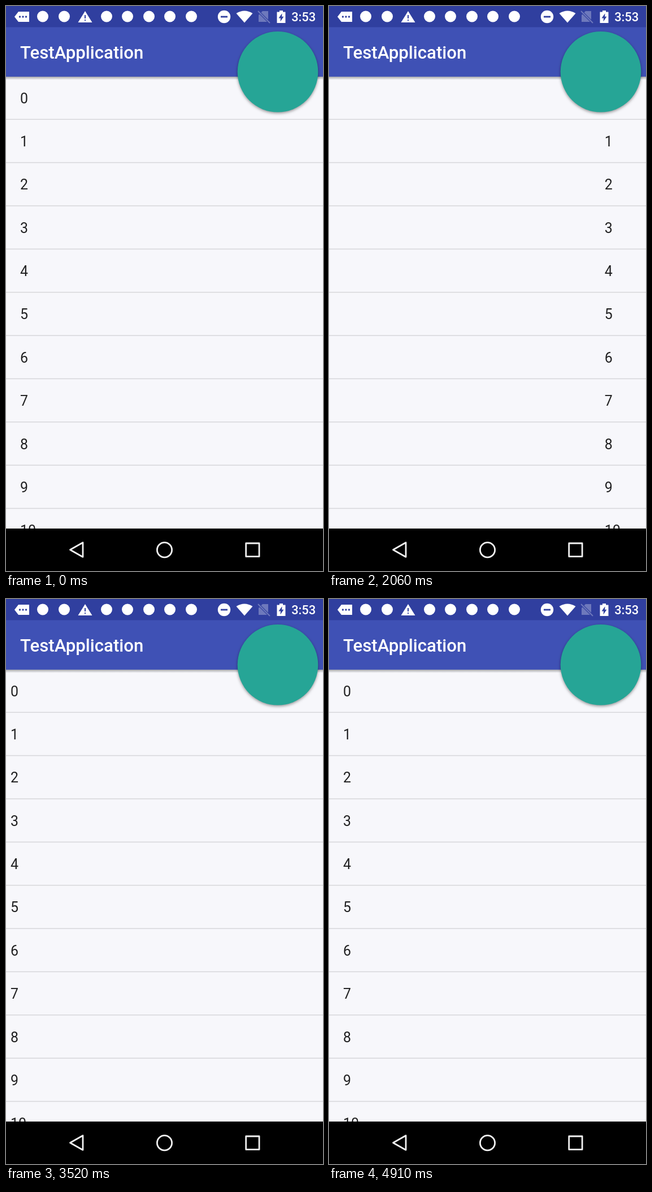
Recreate the animation shown at these times as an HTML page with a canvas. Size 561 px wide and 998 px high, loop 4950 ms.

```html
<!DOCTYPE html>
<html lang="en">
<head>
<meta charset="utf-8">
<title>List drag</title>
<style>
  html, body { margin: 0; width: 100%; height: 100%; overflow: hidden; background: #000; }
  canvas { display: block; }
</style>
</head>
<body>
<canvas id="stage" width="561" height="998"></canvas>
<script>
const ctx = document.getElementById('stage').getContext('2d');
const W = 561, LOOP = 4950, TICK = 100 / 3;
const DP = W / 360;
const STATUS_H = 24 * DP, BAR_BOTTOM = 80 * DP, NAV_TOP = 923;
const ROW = 49 * DP, REST_X = 16 * DP;
const STATUS_COLOR = '#303f9f';

// Each drag pulls the row text from one x to another; release snaps it back.
const drags = [
  { start: 1250, end: 2100, from: 0, to: 488 },
  { start: 2440, end: 3280, from: 0, to: 483 },
  { start: 3520, end: 4260, from: 8, to: 485 },
  { start: 4570, end: 4910, from: 0, to: 400 },
];

const tickAt = t => Math.floor((t + 5) / TICK);

function textX(t) {
  const d = drags.find(d => t >= d.start && t < d.end);
  if (!d) return REST_X;
  const elapsed = (tickAt(t) - tickAt(d.start)) * TICK;
  const p = Math.min(1, elapsed / (d.end - d.start - 30));
  return d.from + (d.to - d.from) * Math.sin(p * Math.PI / 2);
}

function rect(x, y, w, h, color) {
  ctx.fillStyle = color;
  ctx.fillRect(x, y, w, h);
}

function disc(x, y, r, color) {
  ctx.fillStyle = color;
  ctx.beginPath();
  ctx.arc(x, y, r, 0, Math.PI * 2);
  ctx.fill();
}

function trace(...points) {
  ctx.beginPath();
  points.forEach(([x, y]) => ctx.lineTo(x, y));
  ctx.closePath();
}

function poly(color, ...points) {
  ctx.fillStyle = color;
  trace(...points);
  ctx.fill();
}

function label(text, x, y, size, color, weight = 400) {
  ctx.font = `${weight} ${size}px Roboto, sans-serif`;
  ctx.fillStyle = color;
  ctx.fillText(text, x, y);
}

function drawList(x) {
  rect(0, BAR_BOTTOM, W, NAV_TOP - BAR_BOTTOM, '#f7f7fb');
  for (let i = 0; i <= 10; i++) {
    const top = BAR_BOTTOM + i * ROW;
    label(String(i), x, top + 47, 16 * DP, 'rgba(0,0,0,.87)');
    rect(0, top + 48 * DP, W, DP, 'rgba(0,0,0,.13)');
  }
}

function drawAppBar() {
  const shade = ctx.createLinearGradient(0, BAR_BOTTOM, 0, BAR_BOTTOM + 6);
  shade.addColorStop(0, 'rgba(0,0,0,.32)');
  shade.addColorStop(1, 'rgba(0,0,0,0)');
  rect(0, BAR_BOTTOM, W, 6, shade);
  rect(0, 0, W, BAR_BOTTOM, '#3f51b5');
  rect(0, 0, W, STATUS_H, STATUS_COLOR);
  label('TestApplication', REST_X, 93.2, 20 * DP, '#fff', 500);
}

function drawNotifications() {
  poly('#fff', [15, 19], [22, 10], [41, 10], [41, 28], [22, 28]);
  [24.5, 30, 35.5].forEach(x => disc(x, 19, 1.7, STATUS_COLOR));
  [65, 103, 178, 215, 253, 290, 328].forEach(x => disc(x, 18.5, 10, '#fff'));
  poly('#fff', [140, 9], [152.5, 29], [127.5, 29]);
  rect(139, 16, 2, 6, STATUS_COLOR);
  rect(139, 24, 2, 2, STATUS_COLOR);
}

function drawSystemIcons() {
  disc(386, 19, 11.2, '#fff');
  rect(380, 17.6, 12, 2.8, STATUS_COLOR);

  ctx.fillStyle = '#fff';
  ctx.beginPath();
  ctx.moveTo(422, 29.5);
  ctx.lineTo(407.5, 13);
  ctx.quadraticCurveTo(422, 4, 436.5, 13);
  ctx.fill();

  const faint = 'rgba(255,255,255,.3)';
  poly(faint, [454, 9], [464, 9], [464, 28], [447, 28], [447, 16]);
  ctx.strokeStyle = STATUS_COLOR;
  ctx.lineWidth = 4;
  ctx.beginPath();
  ctx.moveTo(446, 9);
  ctx.lineTo(467, 30);
  ctx.stroke();
  ctx.strokeStyle = faint;
  ctx.lineWidth = 2;
  ctx.stroke();

  rect(484, 8, 6, 3, '#fff');
  rect(479.5, 10.5, 15, 19.5, '#fff');
  poly(STATUS_COLOR, [488.5, 13], [482.5, 21.5], [486, 21.5],
    [485.5, 27.5], [491.5, 18.8], [488.2, 18.8]);

  label('3:53', 505.2, 27.2, 14 * DP, '#fff', 500);
}

function drawButton() {
  ctx.save();
  ctx.shadowColor = 'rgba(0,0,0,.4)';
  ctx.shadowBlur = 5;
  ctx.shadowOffsetY = 2;
  disc(481, 116.3, 71.3, '#26a596');
  ctx.restore();
}

function drawNavBar() {
  rect(0, NAV_TOP, W, 998 - NAV_TOP, '#000');
  ctx.strokeStyle = '#f2f2f2';
  ctx.lineWidth = 2.8;
  ctx.lineJoin = 'round';
  trace([113.5, 960.5], [136, 947.8], [136, 973.2]);
  ctx.stroke();
  ctx.beginPath();
  ctx.arc(280.5, 960.8, 13.1, 0, Math.PI * 2);
  ctx.stroke();
  ctx.strokeRect(424.7, 949, 23.4, 23.4);
}

function draw(t) {
  drawList(textX(t));
  drawAppBar();
  drawNotifications();
  drawSystemIcons();
  drawButton();
  drawNavBar();
}

const began = performance.now();
function frame() {
  draw((performance.now() - began) % LOOP);
  requestAnimationFrame(frame);
}
frame();
</script>
</body>
</html>
```
